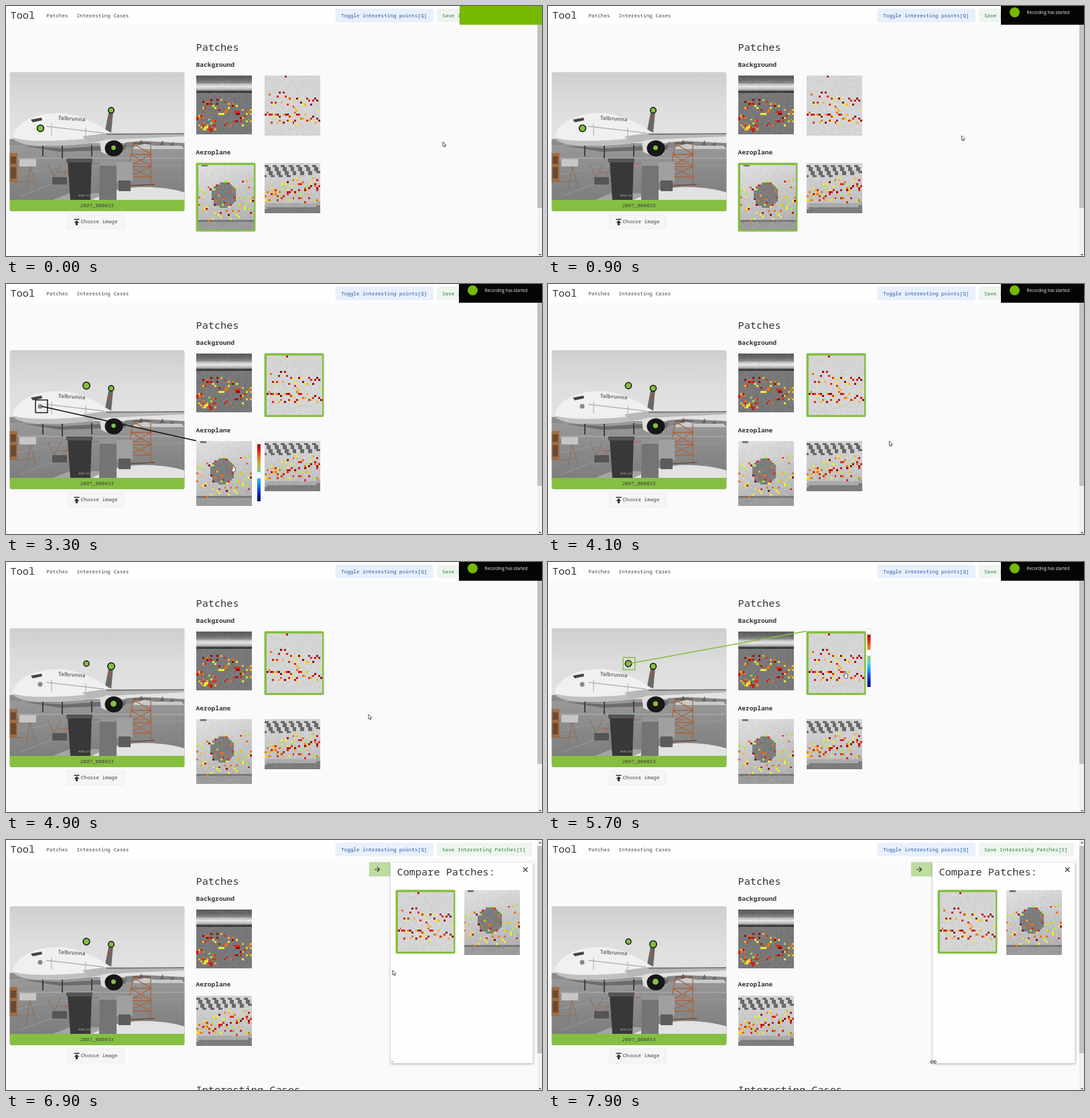
An HTML page with a canvas that plays this animation: 800x374 px, repeating every 8000 ms.

```html
<!DOCTYPE html>
<html lang="en">
<head>
<meta charset="utf-8">
<title>Patch tool</title>
<style>
html, body { margin: 0; width: 100%; height: 100%; overflow: hidden; background: #faf9fb; }
canvas { display: block; }
</style>
</head>
<body>
<canvas id="stage" width="800" height="374"></canvas>
<script>
const c = document.getElementById('stage').getContext('2d');
const GREEN = '#84bf41', CELL = 83 / 28;
const MONO = '"Noto Sans Mono", "DejaVu Sans Mono", monospace';

let seed = 7;
const rnd = () => (seed = (seed * 16807) % 2147483647) / 2147483647;
const clamp = v => Math.max(0, Math.min(1, v));
const ease = v => { v = clamp(v); return v * v * (3 - 2 * v); };

// ---------- drawing helpers ----------
function rect(color, x, y, w, h) { c.fillStyle = color; c.fillRect(x, y, w, h); }
function round(color, x, y, w, h, r) {
  c.fillStyle = color;
  c.beginPath(); c.roundRect(x, y, w, h, r); c.fill();
}
function disc(color, x, y, r, edge, width) {
  c.beginPath(); c.arc(x, y, r, 0, 7);
  c.fillStyle = color; c.fill();
  if (edge) { c.strokeStyle = edge; c.lineWidth = width; c.stroke(); }
}
function fill(color, d) { c.fillStyle = color; c.fill(new Path2D(d)); }
function line(color, width, d) {
  c.strokeStyle = color; c.lineWidth = width; c.stroke(new Path2D(d));
}
function text(s, x, y, size = 7.65, color = '#444', weight = 400, family = MONO) {
  c.font = `${weight} ${size}px ${family}`;
  c.fillStyle = color;
  c.textBaseline = 'middle';
  c.fillText(s, x, y);
}
const heading = (s, x, y) => text(s, x, y, 15.25, '#333', 500);
function vertical(y0, y1, ...stops) {
  const g = c.createLinearGradient(0, y0, 0, y1);
  stops.forEach((s, i) => g.addColorStop(i / (stops.length - 1), s));
  return g;
}

// ---------- pixelated patches ----------
const HEAT = ['#8f0808', '#c81414', '#e02a10', '#ee7018', '#f8b428', '#f2ea30', '#a8ee38'];

// bands: [count, x0, y0, x1, y1, spread, first colour, last colour]
function makePatch(height, shade, bands) {
  const cv = document.createElement('canvas');
  const rows = Math.round(height / CELL);
  cv.width = 28; cv.height = rows;
  const g = cv.getContext('2d');
  for (let y = 0; y < rows; y++) for (let x = 0; x < 28; x++) {
    const v = Math.round(shade(x, y) + (rnd() - .5) * 8);
    g.fillStyle = `rgb(${v},${v},${v})`;
    g.fillRect(x, y, 1, 1);
  }
  for (const [n, x0, y0, x1, y1, spread, lo, hi] of bands) for (let i = 0; i < n; i++) {
    const k = (i + rnd()) / n, dy = (rnd() * 2 - 1) * spread;
    g.fillStyle = HEAT[lo + Math.floor(rnd() * (hi - lo + 1))];
    g.fillRect(Math.floor(x0 + (x1 - x0) * k), Math.round(y0 + (y1 - y0) * k + dy), 1, 1);
  }
  return { cv, height };
}

const stripes = [95, 100, 112, 135, 195, 225, 200, 145, 60];
const floorPatch = makePatch(88, (x, y) => stripes[y] ?? 120, [
  [38, 3, 13, 28, 20, 3.5, 0, 6], [26, 0, 23, 10, 26, 4, 1, 6], [12, 11, 21, 28, 22, 4, 0, 5]]);
const skyPatch = makePatch(89.5, () => 212, [
  [1, 10, 0, 10, 0, 0, 1, 1], [26, 2, 10, 28, 15, 3.5, 0, 5],
  [24, 0, 20, 17, 22, 2.5, 0, 5], [14, 14, 18, 28, 21, 3, 0, 4]]);
const nosePatch = makePatch(97, (x, y) =>
  Math.hypot(x - 12.7, y - 15) < 6.3 ? 125 :
  y < 1 && x > 1 && x < 5 ? 120 : y > 28 ? 155 : y === 28 ? 120 : 224 - y * 1.3 - x * .4, [
  [38, 0, 17, 28, 17, 10, 0, 6], [26, 0, 23, 28, 22, 6, 3, 6]]);
const bodyPatch = makePatch(75, (x, y) =>
  y > 0 && y < 7 - x * .08 && (x + 28 - (y >> 1)) % 4 < 2 ? 105 :
  y > 22 - x * .04 ? 125 : y > 20 - x * .04 ? 170 : 212 - y, [
  [54, 0, 14, 28, 10, 4.5, 0, 6], [14, 0, 18, 28, 17, 3, 2, 6]]);

function drawPatch(p, x, y, selected) {
  const pad = selected ? 3 : 0;
  if (selected) round(GREEN, x - .5, y - .5, 89, p.height + 6, 2);
  c.imageSmoothingEnabled = false;
  c.drawImage(p.cv, x + pad * .85, y + pad * .85, 83, p.height);
}

// ---------- photograph ----------
function drawPhoto() {
  c.save();
  c.beginPath(); c.roundRect(5.5, 99, 261, 208, 3); c.clip();
  rect(vertical(99, 206, '#cfcfcf', '#dddddd', '#e4e4e4'), 5, 99, 262, 108);
  rect(vertical(204, 290, '#9a9a9a', '#8a8a8a', '#7e7e7e'), 5, 205, 262, 86);
  rect('#8c8c8c', 5, 199, 20, 9);
  fill('#858585', 'M178 208V204L205 202L266 205V212H178Z');
  fill('#cacaca', 'M190 211L205 206L222 209L262 209L266 214H190Z');
  fill('#666', 'M197 208L202 200L205 207ZM229 208L234 201L236 208ZM244 209L250 204L250 209Z');
  rect('#aaa', 5, 227, 262, 1.5);
  line('#999', 1, 'M5 255L80 240L267 238M20 285L110 250');
  // aircraft
  fill('#6c6c6c', 'M25 209L85 213L180 207L178 215L80 218Z');
  line('#3e3e3e', 2, 'M55 208V225M84 209V228M128 208V225');
  fill('#686868', 'M148 186L153 160Q156 155 160 158L157 190Z');
  fill('#8e5a52', 'M152 168L159 165L158 170L151 173Z');
  fill('#f0f0f0', 'M10 195Q13 180 34 169Q52 160 84 160Q120 165 152 187L160 191L158 200Q105 210 55 209Q15 208 10 195Z');
  fill('#c0c0c0', 'M10 197Q50 208 158 194L158 200Q105 210 55 209Q15 208 10 197Z');
  fill('#444', 'M37 170L53 167L54 171L40 174Z');
  line('#999', 1, 'M60 180L146 190');
  line('#aaa', 1, 'M68 176V194M119 182V195');
  fill('#b8b8b8', 'M114 195L151 190L266 191V195L176 199L123 204Z');
  line('#6c6c6c', 1.5, 'M150 192L266 191');
  fill('#dedede', 'M140 203Q151 197 168 201L173 221Q155 226 142 218Z');
  c.beginPath(); c.ellipse(161, 213, 13.5, 12, 0, 0, 7); c.fillStyle = '#171717'; c.fill();
  disc('#888', 51, 183, 3.5);
  c.save();
  c.translate(78, 168); c.rotate(.06);
  text('Talbrunna', 0, 0, 8, '#707070', 700, '"Open Sans", sans-serif');
  c.restore();
  // ground equipment
  fill('#a06c42', 'M5 220H17V263H5Z');
  fill('#6b4a32', 'M7 225H15V236H7ZM7 241H15V258H7Z');
  fill('#c6c6c6', 'M20 229H45V240H20Z');
  line('#8f6a52', 1, 'M30 274L36 240L46 274M32 262H43M6 263H30M62 236L72 256L82 236');
  line('#ab6245', 1, 'M126 236H205M79 249H94M80 264L91 247');
  rect('#555', 69, 256, 22, 11);
  line('#ad6138', 1.3, 'M179 269L190 205M216 268V208M186 222H217M183 240H217M181 256H217M186 222L217 240L181 256M190 206L217 222L183 240L217 256');
  line('#6e4a38', 1.5, 'M190 205H216M178 269L222 267');
  fill('#e2e2e2', 'M122 290Q170 268 218 271Q249 273 267 279V290Z');
  fill('#a4a4a4', 'M70 290L95 280H150L128 290Z');
  fill('#383838', 'M92 232L128 229L126 290H96Z');
  rect('#555', 90, 228, 39, 6);
  fill('#747474', 'M140 235H165V290H139Z');
  rect('#959595', 139, 232, 26, 7);
  fill('#a0a0a0', 'M165 233H189V263H165Z');
  rect('#5c5c5c', 168, 261, 18, 16);
  text('MODEL 204', 108, 284, 3, '#aaa', 500, 'Inter, sans-serif');
  rect(GREEN, 5, 290, 262, 18);
  c.restore();
  text('2007_000033', 110.5, 298.5);
}

// ---------- pointer ----------
const path = [
  [0, 652, 206], [700, 652, 206], [1500, 430, 148], [2400, 430, 148], [3000, 339, 275],
  [3500, 339, 275], [4300, 541, 231], [5000, 541, 231], [5500, 444, 168], [5800, 444, 168],
  [6800, 577, 198], [7100, 577, 198], [7800, 575, 332], [8000, 575, 332]];

function pointerAt(t) {
  const i = path.findIndex((p, j) => j && t <= p[0]);
  const [t0, x0, y0] = path[i - 1], [t1, x1, y1] = path[i];
  const k = ease((t - t0) / (t1 - t0));
  return [x0 + (x1 - x0) * k, y0 + (y1 - y0) * k];
}

function drawPointer(x, y, kind) {
  c.save();
  c.translate(x, y);
  const shapes = {
    arrow: 'M0 -3L0 4L1.6 2.8L2.7 5L3.8 4.5L2.8 2.3L5 2.2Z',
    hand: 'M-1 -4Q0 -5 .8 -4V-1L3.4 0V4L2.4 6H-1L-3.2 2.2L-2.6 1.4L-1 2.5Z',
    resize: 'M-5 0L-2.3 -2.5V-.8H2.3V-2.5L5 0L2.3 2.5V.8H-2.3V2.5Z'
  };
  fill('#fff', shapes[kind]);
  line('#333', .8, shapes[kind]);
  c.restore();
}

// ---------- interface ----------
function drawChrome(t) {
  rect('#faf9fb', 0, 0, 800, 374);
  rect('#fefefe', 0, 0, 793, 28);
  heading('Tool', 6.5, 14.5);
  text('Patches', 60.5, 14.5);
  text('Interesting Cases', 105.5, 14.5);
  round('#e8f0fb', 491.5, 4, 146.5, 20.5, 3);
  text('Toggle interesting points[Q]', 500, 14.5, 7.65, '#235aa5');
  round('#eef5ef', 643, 4, 142, 20.5, 3);
  text('Save Interesting Patches[S]', 651, 14.5, 7.7, '#2c7f3b');
  rect('#f1f1f1', 793, 0, 7, 374);
  rect('#c2c2c2', 793, 9, 7, t < 6400 ? 293 : 310);
  fill('#555', 'M795 371H799L797 373.5ZM795 5H799L797 2.5Z');
  round('#e9e9e9', 91, 312, 86, 22, 3);
  round('#f5f5f5', 91.5, 312.5, 85, 21, 3);
  fill('#333', 'M101.5 318.5H109.5V320H101.5ZM105.5 320.5L109.5 324.5H107V328H104V324.5H101.5Z');
  text('Choose image', 111.5, 323);
  heading('Patches', 283.5, 62.5);
  text('Background', 283.5, 88, 9.6, '#333', 600);
}

function drawPoints(t, bgOn, noseOn) {
  const swing = .6 * Math.cos((t - 1900) / 3000 * 2 * Math.PI);
  const dot = (x, y, s) => disc(GREEN, x, y, 4.6 + s, '#111', 1.5);
  dot(157, 156, swing);
  dot(160.5, 212, swing);
  if (noseOn) dot(51.5, 183, -swing);
  if (bgOn) dot(120, 152, -swing);
}

function drawLink(px, py, half, x, y, selected) {
  const color = selected ? GREEN : '#111';
  c.strokeStyle = color; c.lineWidth = 1.4;
  c.strokeRect(px - half, py - half - .5, half * 2, half * 2 + 1);
  line(color, 1.4, `M${px} ${py}L${x} ${y}`);
}

function drawSlider(x, y, h, knob) {
  const bar = vertical(y, y + h, '#8a0000', '#d81c08', '#ef7b20', '#a5c75a', '#48d8d8', '#168ce8', '#1226c8', '#06066e');
  rect(bar, x - 2.5, y, 5, h);
  for (const dy of [0, knob]) disc('#fff', x, y + dy, 4.6, '#d8d8d8', .8);
}

function drawPanel(t) {
  c.save();
  c.translate(258 * (1 - ease((t - 6350) / 350)), 0);
  rect('#bcdca0', 542, 33, 31.5, 21.5);
  line('#333', 1.1, 'M550 44H557.5M554 40.5L557.5 44L554 47.5');
  c.shadowColor = '#0005'; c.shadowBlur = 3; c.shadowOffsetY = 1;
  rect('#fefefe', 574, 34, 212.5, 300);
  c.shadowColor = 'transparent';
  heading('Compare Patches:', 583.5, 48.5);
  line('#333', 1.1, 'M772 41L778.5 47.5M778.5 41L772 47.5');
  line('#888', .8, 'M575 329L578.5 333M575 331.5L576.5 333');
  drawPatch(skyPatch, 582, 75, true);
  drawPatch(nosePatch, 683.5, 75, false);
  c.restore();
}

function drawNotice(t) {
  if (t >= 6200) return;
  c.save();
  c.translate(124 * ease((t - 5900) / 300), 0);
  rect('#76b900', 677, 0, 123, 28);
  const left = 800 - 124 * ease(t / 500);
  rect('#050505', left, 0, 800 - left, 28);
  if (t >= 500) {
    disc('#76b900', 696.5, 9.5, 7.5);
    text('Recording has started', 714.5, 10, 6.3, '#eee', 400, '"Open Sans", sans-serif');
  }
  c.restore();
}

function draw(t) {
  const comparing = t >= 6400, bgOn = t >= 1900, noseOn = t < 3100;
  const [mx, my] = pointerAt(t);
  const over = (x, y, h) => !comparing && mx > x && mx < x + 88 && my > y && my < y + h;
  const bgHover = over(386, 104, 95), noseHover = over(284, 235, 100);

  drawChrome(t);
  drawPhoto();
  drawPoints(t, bgOn, noseOn);
  text('Aeroplane', 283.5, comparing ? 216.5 : 219.5, 9.6, '#333', 600);
  drawPatch(floorPatch, 284, 104, false);
  if (comparing) {
    drawPatch(bodyPatch, 284, 232.5, false);
    heading('Interesting Cases', 283.5, 375);
    drawPanel(t);
  } else {
    drawPatch(skyPatch, 386, 104, bgOn);
    drawPatch(nosePatch, 284, 235, noseOn);
    drawPatch(bodyPatch, 386, 235, false);
  }
  if (bgHover) {
    drawLink(121, 152, 8.7, 385.5, 103.5, bgOn);
    drawSlider(479, 104, 83, 32);
  }
  if (noseHover) {
    drawLink(53, 183, 9, 284, 234.5, noseOn);
    drawSlider(377.5, 235, 90, 51);
  }
  drawNotice(t);
  drawPointer(mx, my, bgHover || noseHover ? 'hand' : t > 7100 && mx < 576.5 ? 'resize' : 'arrow');
}

function tick() {
  draw(Math.floor(performance.now() % 8000 / 100) * 100);
  requestAnimationFrame(tick);
}
tick();
</script>
</body>
</html>
```
